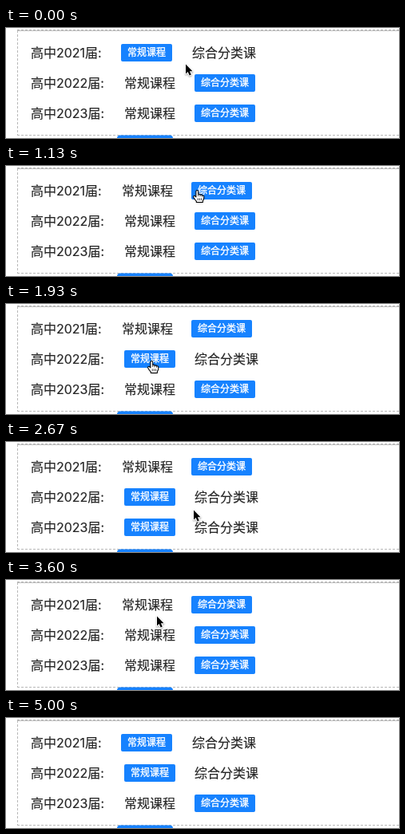
Write an HTML page with a canvas that moves like this. It is 492 px wide and 138 px high and loops after 5510 ms.

```html
<!DOCTYPE html>
<html lang="zh-CN">
<head>
<meta charset="utf-8">
<title>课程选择</title>
<style>
  html, body { margin: 0; width: 100%; height: 100%; overflow: hidden; background: #fff; }
  #stage { position: relative; width: 492px; height: 138px; overflow: hidden; }
  canvas { position: absolute; left: 0; top: 0; width: 492px; height: 138px; }
  span {
    position: absolute; box-sizing: border-box; height: 22px; white-space: nowrap;
    font: 16px/22px Inter, "Noto Sans CJK SC", "Noto Sans CJK", sans-serif;
    color: #242424; -webkit-text-stroke: 0.15px currentColor;
  }
  .option.on {
    padding: 0 8px; border-radius: 2px; background: #1682ff; color: #fff;
    font-size: 12px; -webkit-text-stroke-width: 0.35px;
  }
</style>
</head>
<body>
<div id="stage"></div>
<script>
const LOOP = 5510, W = 492, H = 138;
const stage = document.getElementById('stage');

const options = [{ text: '常规课程', dx: 0 }, { text: '综合分类课', dx: 88 }];
const rows = [2021, 2022, 2023].map((year, i) => ({
  label: `高中${year}届:`,
  x: i ? 148 : 144,
  inset: i ? 0 : 1, // plain text sits slightly right of the tag in the narrower first row
  y: 20 + 38 * i,
  initial: i ? 1 : 0
}));

// The pointer rests at each stop; a pick also clicks the option under it.
const rest = (arrive, x, y) => ({ arrive, x, y });
const pick = (arrive, click, row, option, dy) => ({
  arrive, click, row, option,
  x: rows[row].x + (option ? 96 : 35),
  y: rows[row].y + dy
});
const stops = [
  rest(0, 224, 44),
  rest(230, 181, 62),
  pick(800, 1000, 0, 1, 10),
  rest(1500, 190, 54),
  pick(1700, 1870, 1, 0, 13),
  pick(2100, 2370, 2, 0, 2),
  rest(2670, 234, 84),
  pick(2830, 3000, 1, 1, 11),
  pick(3200, 3400, 2, 1, 8),
  rest(3600, 188, 44),
  pick(3900, 4000, 0, 0, 10),
  rest(4180, 187, 93),
  pick(4330, 4530, 1, 0, 13),
  rest(4970, 434, 24)
];
const LEAVE = stops[stops.length - 1].arrive;

function addText(text, x, y, cls) {
  const el = document.createElement('span');
  el.textContent = text;
  el.className = cls;
  el.style.left = x + 'px';
  el.style.top = y + 'px';
  stage.appendChild(el);
  return el;
}

for (const row of rows) {
  addText(row.label, 31, row.y, 'label');
  row.tags = options.map(o => addText(o.text, row.x + o.dx, row.y, 'option'));
}

const canvas = document.createElement('canvas');
const scale = window.devicePixelRatio || 1;
canvas.width = W * scale;
canvas.height = H * scale;
stage.appendChild(canvas);
const ctx = canvas.getContext('2d');

const arrow = new Path2D('M0 0V12L2.7 9.5L4.7 14L6.8 13L4.9 8.7H8.5Z');
const hand = new Path2D(
  'M-1.5 9V1.6Q-1.5 0 0 0Q1.5 0 1.5 1.6V5.4Q3.4 4.6 4 6Q6 5.2 6.7 6.8Q9 6.4 9 8.6' +
  'V10.5Q8.7 12.2 7.5 14V16H-1V14.5Q-3 12.5 -5 9Q-5 7 -3.3 7.4Z');
const fingers = new Path2D('M1.5 5.4V8M4 6V8.4M6.7 6.8V8.8M1 10.5V13.5M3.3 10.5V13.5M5.6 10.5V13.5');

function line(x1, y1, x2, y2, color, dash) {
  ctx.strokeStyle = color;
  ctx.lineWidth = 1;
  ctx.setLineDash(dash);
  ctx.beginPath();
  ctx.moveTo(x1, y1);
  ctx.lineTo(x2, y2);
  ctx.stroke();
  ctx.setLineDash([]);
}

function drawFrame() {
  const dash = [3, 2];
  line(14, 2.5, W, 2.5, '#b0b0b0', dash);
  line(14, 3.5, W, 3.5, '#c4c4c4', []);
  line(14.5, 3, 14.5, 134, '#b8b8b8', dash);
  line(14, 134.5, W, 134.5, '#b8b8b8', dash);
  ctx.fillStyle = '#1682ff';
  ctx.beginPath();
  ctx.roundRect(139, 134.5, 70, 30, 4);
  ctx.fill();
}

// Longer moves take longer, and each ends at its stop's arrival time.
function pointerAt(t) {
  const next = stops.findIndex(s => s.arrive > t);
  const a = stops[next - 1], b = stops[next];
  const duration = 60 + 1.6 * Math.hypot(b.x - a.x, b.y - a.y);
  const u = Math.max(0, 1 - (b.arrive - t) / duration);
  const e = u * u * (3 - 2 * u);
  return [a.x + (b.x - a.x) * e, a.y + (b.y - a.y) * e];
}

function isOverOption(x, y, chosen) {
  return rows.some((row, r) => y >= row.y && y < row.y + 22 && options.some((o, i) => {
    const n = o.text.length;
    const left = row.x + o.dx;
    const width = chosen[r] === i ? n * 12 + 16 : n * 16;
    return x >= left && x < left + width;
  }));
}

function drawPointer(x, y, isHand) {
  ctx.save();
  ctx.translate(Math.round(x), Math.round(y));
  ctx.lineJoin = 'round';
  ctx.shadowColor = 'rgba(0,0,0,.35)';
  ctx.shadowBlur = 2 * scale;
  ctx.shadowOffsetY = scale;
  if (isHand) {
    ctx.translate(-0.7, 0.5);
    ctx.scale(0.94, 0.94);
    ctx.fillStyle = '#fff';
    ctx.fill(hand);
    ctx.shadowColor = 'transparent';
    ctx.strokeStyle = '#000';
    ctx.lineWidth = 1.1;
    ctx.stroke(hand);
    ctx.lineWidth = 0.8;
    ctx.stroke(fingers);
  } else {
    ctx.translate(1, 1.5);
    ctx.strokeStyle = '#fff';
    ctx.lineWidth = 2;
    ctx.stroke(arrow);
    ctx.shadowColor = 'transparent';
    ctx.fillStyle = '#000';
    ctx.fill(arrow);
  }
  ctx.restore();
}

function showChoices(chosen) {
  rows.forEach((row, r) => row.tags.forEach((tag, i) => {
    const on = chosen[r] === i;
    tag.classList.toggle('on', on);
    tag.style.left = row.x + options[i].dx + (on ? 0 : row.inset) + 'px';
  }));
}

function render(t) {
  const chosen = rows.map(row => row.initial);
  for (const s of stops) if (t >= s.click) chosen[s.row] = s.option;
  showChoices(chosen);

  ctx.setTransform(scale, 0, 0, scale, 0, 0);
  ctx.clearRect(0, 0, W, H);
  drawFrame();
  if (t < LEAVE) {
    const [x, y] = pointerAt(t);
    drawPointer(x, y, isOverOption(x, y, chosen));
  }
}

const start = performance.now();
function tick() {
  render((performance.now() - start) % LOOP);
  requestAnimationFrame(tick);
}
tick();
</script>
</body>
</html>
```
